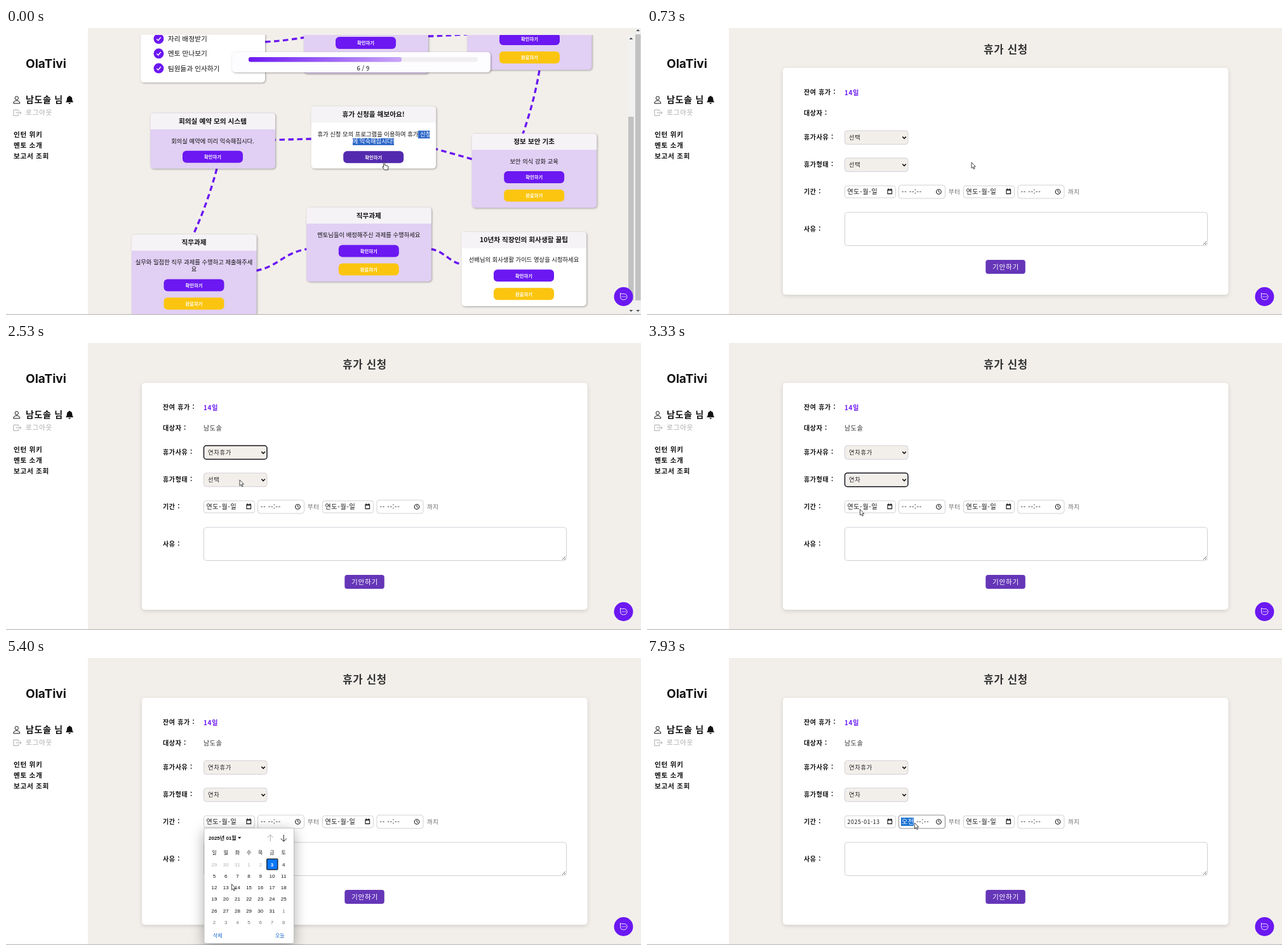
These frames come from a looping animation (1000 by 453 pixels, 8000 ms). An HTML page:

```html
<!DOCTYPE html>
<html lang="ko">
<head>
<meta charset="utf-8">
<title>휴가 신청</title>
<style>
html, body { margin: 0; width: 100%; height: 100%; overflow: hidden; background: #f2efeb; }
svg { display: block; width: 100vw; height: 100vh; }
text { font-family: "Noto Sans CJK KR", "Noto Sans CJK", "Noto Sans KR", sans-serif; white-space: pre; }
.sp { letter-spacing: .67px; }
.cal text { font-family: "Liberation Sans", "Noto Sans CJK KR", sans-serif; }
.card { filter: drop-shadow(1px 1.5px 1.5px #0005); }
.panel { filter: drop-shadow(0 2px 3px #0002); }
.pop { filter: drop-shadow(0 5px 10px #0005); }
</style>
</head>
<body>
<svg id="stage" viewBox="0 0 1000 453" preserveAspectRatio="none"></svg>
<script>
const PURPLE = '#6b18f2', YELLOW = '#fbc50f', BEIGE = '#f2efeb', LILAC = '#e1cff4', BLUE = '#1b67cb';
const USER = '남도솔';

const rect = (x, y, w, h, fill, r = 0, more = '') =>
  `<rect x="${x}" y="${y}" width="${w}" height="${h}" rx="${r}" fill="${fill}" ${more}/>`;
const text = (x, y, size, str, fill = '#111', more = '') =>
  `<text x="${x}" y="${y}" font-size="${size}" fill="${fill}" ${more}>${str}</text>`;
const line = (d, stroke = '#111', w = 1, more = '') =>
  `<path d="${d}" fill="none" stroke="${stroke}" stroke-width="${w}" ${more}/>`;
const group = (id, body, more = '') => `<g id="${id}" ${more}>${body}</g>`;
const MID = 'text-anchor="middle"', BOLD = 'font-weight="700"';
const SP = 'class="sp"', SPB = SP + ' ' + BOLD;

// Task board
const button = (cx, y, label, fill) =>
  rect(cx - 47.5, y, 95, 19, fill, 6) + text(cx, y + 12.3, 7.33, label, '#fff', MID + ' ' + BOLD);
const check = (x, y) => `<circle cx="${x}" cy="${y}" r="8" fill="${PURPLE}"/>` +
  line(`M${x - 3.2} ${y + .3}l2.4 2.4 4-5`, '#fff', 1.4);

function card(x, y, h, fill, title, lines, done, ok = PURPLE) {
  const cx = x + 98, by = y + 48 + lines.length * 11.3;
  return `<g class="card">${rect(x, y, 196.5, h, fill, 5)}` +
    `<path d="M${x} ${y + 25.5}v-20.5q0-5 5-5h186.5q5 0 5 5v20.5z" fill="#f5f3f6"/></g>` +
    text(cx, y + 16.3, 10.67, title, '#111', MID + ' ' + BOLD) +
    lines.map((s, i) => s && text(cx, y + 47 + i * 11, 9.33, s, '#111', MID)).join('') +
    button(cx, by, '확인하기', ok) + (done ? button(cx, by + 29, '완료하기', YELLOW) : '');
}

const links = ['M408 22Q440 20 469 15', 'M665 13Q695 12 726 10', 'M840 67Q832 115 814 167',
  'M734 207L677 191', 'M481 175L424 176.5', 'M332 222Q318 275 295 326',
  'M394 383C430 376 436 355 474 349', 'M669 349C690 352 697 369 718 373'];
const tri = (x, y, s) => `<path d="M${x - 3} ${y + s}h6l-3 ${-3 * s}z" fill="#505050"/>`;

const board = `<clipPath id="view"><rect x="129" y="11" width="850" height="441"/></clipPath>
  <g clip-path="url(#view)">` +
  links.map(d => line(d, PURPLE, 3.4, 'stroke-dasharray="8.5 5.5"')).join('') +
  rect(212, -20, 196, 106, '#fff', 5, 'class="card"') +
  ['자리 배정받기', '멘토 만나보기', '팀원들과 인사하기'].map((s, i) =>
    check(240.5, 17 + i * 23.3) + text(255, 21 + i * 23.3, 10.67, s)).join('') +
  rect(469, -20, 196, 92, LILAC, 5, 'class="card"') + button(566.5, 14, '확인하기', PURPLE) +
  rect(726.5, -20, 196, 86, LILAC, 5, 'class="card"') + button(824.5, 8, '확인하기', PURPLE) +
  button(824.5, 37, '완료하기', YELLOW) +
  card(227.5, 134.5, 87.5, LILAC, '회의실 예약 모의 시스템', ['회의실 예약에 미리 익숙해집시다.']) +
  card(480.7, 123.7, 98, '#fff', '휴가 신청을 해보아요!', ['', ''], false, '#532aae') +
  rect(649, 162, 18.5, 12.3, '#2f68c9') + rect(546, 174, 65, 11, '#2f68c9') +
  text(490.5, 171, 9.33, '휴가 신청 모의 프로그램을 이용하여 휴가 <tspan fill="#fff">신청</tspan>') +
  text(578.5, 182, 9.33, '에 익숙해집시다!', '#fff', MID) +
  card(733.7, 166.7, 117, LILAC, '정보 보안 기초', ['보안 의식 강화 교육'], true) +
  card(198, 326, 128, LILAC, '직무과제', ['실무와 밀접한 직무 과제를 수행하고 제출해주세', '요'], true) +
  card(473.3, 283.3, 117, LILAC, '직무과제', ['멘토님들이 배정해주신 과제를 수행하세요'], true) +
  card(717.5, 322, 117, '#fff', '10년차 직장인의 회사생활 꿀팁', ['선배님의 회사생활 가이드 영상을 시청하세요'], true) +
  `<linearGradient id="fill"><stop stop-color="${PURPLE}"/><stop offset="1" stop-color="#c9a6f6"/></linearGradient>` +
  rect(356, 38, 407, 32, '#fdfcfe', 5, 'class="card"') +
  rect(382, 46, 361, 7.5, '#f1eff1', 3) + rect(382, 46, 241, 7.5, 'url(#fill)', 3) +
  text(562.5, 66.5, 9.6, '6 / 9', '#111', MID) + '</g>' +
  rect(979.5, 11, 10, 441, '#f1f1f1') + rect(990, 0, 10, 453, '#f1f1f1') +
  rect(980, 140, 8.5, 290, '#c1c1c1') + rect(991, 10, 8.5, 420, '#c1c1c1') +
  tri(984.3, 17, 1) + tri(995.2, 4, 1) + tri(984.3, 446, -1) + tri(995.2, 446, -1);

// Leave form
const select = (y, id) => rect(311.5, y, 99.5, 21.5, BEIGE, 4, `id="${id}Box" stroke="#d2cfd6"`) +
  text(318, y + 14.2, 9.33, '선택', '#222', `${SP} id="${id}"`) +
  line(`M402.3 ${y + 9.6}l2.8 2.8 2.8-2.8`, '#111', 1.5);
const dateBox = (x, id) => rect(x, 249, 80, 19, '#fff', 3.5, 'stroke="#d2cfd6"') +
  text(x + 4, 262, 10, '연도-월-일', '#111', `${SP} id="${id}"`) +
  line(`M${x + 67.5} 255h6.6v6.6h-6.6zm0 1h6.6m-5.3-2.7v1.5m4-1.5v1.5`, '#111', 1.1);
const timeBox = (x, id) => rect(x, 248, 73, 21, '#fff', 4, `id="${id}Box" stroke="#d2cfd6"`) +
  rect(x + 3.5, 252, 9, 13, '#1b72d3', 0, `id="${id}Mark" display="none"`) +
  text(x + 4.5, 262, 10, '<tspan>--</tspan> --:--', '#111', `${SP} id="${id}"`) +
  `<circle cx="${x + 63}" cy="258.5" r="3.8" fill="none" stroke="#111" stroke-width="1.1"/>` +
  line(`M${x + 63} 256v2.7l1.8 1`, '#111', 1);

const labels = [['잔여 휴가', 105], ['대상자', 138], ['휴가사유', 176], ['휴가형태', 219], ['기간', 262], ['사유', 320.5]];
const form = text(565, 40, 16.67, '휴가 신청', '#333', SPB + ' ' + MID) +
  rect(214, 63, 701.5, 358, '#fff', 5, 'class="panel"') +
  labels.map(([s, y]) => text(247, y, 10, s + ' :', '#111', SPB)).join('') +
  text(311, 105.5, 10, '14일', PURPLE, SPB) +
  text(311, 138, 10, USER, '#333', SP + ' id="person"') +
  select(162, 'reason') + select(205.2, 'kind') +
  dateBox(311.5, 'date') + timeBox(396.5, 'time') + text(475, 261.5, 9.33, '부터', '#666', SP) +
  dateBox(498.5, 'date2') + timeBox(584, 'time2') + text(663, 261.5, 9.33, '까지', '#666', SP) +
  rect(311.5, 291, 571, 52.5, '#fff', 4, 'stroke="#d2cfd6"') +
  line('M876 342l5-5m-2 5l2-2', '#555', .9) +
  rect(533.3, 366, 62.5, 22, '#6536b8', 4) + text(565, 381, 10.67, '기안하기', '#fff', SP + ' ' + MID);

const menu = (id, y, items, hot) => group(id,
  rect(312, y, 98, items.length * 17.8, BEIGE, 2, 'class="pop" stroke="#8a8886" stroke-width=".8"') +
  rect(312.4, y + 18.7, 97.2, 17.6, BLUE) +
  items.map((s, i) => text(318, y + 13.2 + i * 17.8, 9.33, s, i == hot ? '#fff' : '#222', SP)).join(''));

function calendar() {
  const col = i => 328 + i * 18.2;
  let s = rect(312, 268.5, 141.5, 182, '#fff', 3, 'class="pop" stroke="#b5b5b5" stroke-width=".8"') +
    text(319, 286.5, 8, '2025년 01월', '#111', BOLD) + '<path d="M365 282.5h5.4l-2.7 3z" fill="#111"/>' +
    line('M416.3 289.5v-10.5m-4.6 4.7l4.6-4.7 4.6 4.7', '#aaa') +
    line('M437.3 279v10.5m-4.6-4.7l4.6 4.7 4.6-4.7', '#222') +
    rect(410.8, 317.3, 17, 16.6, '#0a78ff', 1, 'stroke="#1b2b40" stroke-width="1.5"');
  [...'일월화수목금토'].forEach((d, i) => s += text(col(i), 309.5, 8, d, '#222', MID));
  for (let i = 0; i < 42; i++) {
    const n = i - 2, day = n < 1 ? n + 31 : n > 31 ? n - 31 : n;
    const color = n == 3 ? '#fff' : n < 3 ? '#b4b4b4' : n > 31 ? '#777' : '#111';
    s += text(col(i % 7), 328.7 + Math.floor(i / 7) * 18.25, 8, day, color, MID + (n == 3 ? ' ' + BOLD : ''));
  }
  return s + text(326, 441, 8, '삭제', BLUE) + text(424, 441, 8, '오늘', BLUE);
}

// Side bar and chat button
const side = rect(0, 0, 129, 452, '#fff') +
  text(31, 62.5, 19, 'OlaTivi', '#111', BOLD + ' style="font-family:Inter,sans-serif"') +
  '<circle cx="16.8" cy="110.6" r="2.7" fill="none" stroke="#111"/>' +
  line('M11.8 119c0-3 2-4.3 5-4.3s5 1.3 5 4.3z') +
  text(31, 118, 14, USER + ' 님', '#111', SPB) +
  '<path d="M94 117.3q2-2 2-5.3 0-3.3 3-4 0-1.1 1.1-1.1t1.1 1.1q3 .7 3 4 0 3.3 2 5.3zM98.3 118.2h3.6q-.4 1.8-1.8 1.8t-1.8-1.8z" fill="#111"/>' +
  line('M19.5 131.5v-2.2h-7.6v9h7.6v-2.2m-4-2.3h8.4m-2.4-2.4l2.4 2.4-2.4 2.4', '#aaa') +
  text(31, 137, 10.67, '로그아웃', '#aaa', SP) +
  ['인턴 위키', '멘토 소개', '보고서 조회'].map((s, i) => text(12, 172 + i * 16.9, 10.67, s, '#111', SPB)).join('');
const chat = `<circle cx="972.5" cy="424" r="15" fill="${PURPLE}"/>` +
  line('M967.5 418.5l2 1.2q8.5-1.2 8.5 4.2 0 5-5.6 5-4.9 0-4.9-5z', '#fff', .9) +
  [970.4, 972.8, 975.2].map(x => `<circle cx="${x}" cy="424" r=".75" fill="#fff"/>`).join('');

const arrow = '<path d="M0 0v9.3l2.1-1.8 1.5 3.2 1.5-.7-1.5-3.1h2.8z" fill="#fff" stroke="#333" stroke-width=".9"/>';
const hand = '<path d="M1.6 7.5V1.2q0-1.2 1-1.2t1 1.2v3.4l4.3.9q1.2.3 1.1 1.7L8.4 12H3.2L.2 8.2q-.8-1.2.2-1.5z" fill="#fff" stroke="#222" stroke-width=".9"/>';

const stage = document.getElementById('stage');
stage.innerHTML = rect(0, 0, 1000, 453, BEIGE) + side + group('board', board) + group('form', form) + chat +
  rect(0, 451.7, 1000, 1.3, '#c3c0bd') +
  menu('menu1', 184.3, ['선택', '연차휴가', '출장휴가', '경조휴가', '건강검진'], 1) +
  menu('menu2', 227.5, ['선택', '연차', '반차'], 1) +
  group('cal', calendar(), 'class="cal"') +
  group('pointer', group('arrow', arrow) + group('hand', hand));

const el = id => document.getElementById(id);
const show = (id, on) => el(id).setAttribute('display', on ? 'inline' : 'none');
const put = (id, s) => { if (el(id).textContent !== s) el(id).textContent = s; };
const ring = (id, on, color = '#15151c', w = 1.5) => {
  el(id).setAttribute('stroke', on ? color : '#d2cfd6');
  el(id).setAttribute('stroke-width', on ? w : 1);
};

// Pointer stops: time, x, y
const stops = [[0, 593, 212], [450, 593, 212], [730, 511, 212], [1000, 511, 212], [1480, 378, 173], [1650, 378, 173],
  [1930, 349.5, 208.5], [2180, 349.5, 210], [2450, 368, 216], [2600, 368, 216], [2800, 345, 251], [2980, 345, 251],
  [3330, 335.5, 262.5], [3450, 337, 262], [3750, 381, 258], [4050, 381, 258], [4470, 370, 307.5], [4800, 368, 320],
  [5600, 353, 363.5], [6400, 353.5, 364], [7100, 412, 262], [7400, 421.5, 260], [8000, 421.5, 260]];

function pointerAt(t) {
  const i = stops.findIndex(s => s[0] > t), [t0, x0, y0] = stops[i - 1], [t1, x1, y1] = stops[i];
  const u = (t - t0) / (t1 - t0), e = u * u * (3 - 2 * u);
  return [x0 + (x1 - x0) * e, y0 + (y1 - y0) * e];
}

function draw(t) {
  const within = (a, b) => t >= a && t < b;
  show('board', t < 450);
  show('form', t >= 450);
  show('hand', t < 450);
  show('arrow', t >= 450);
  show('person', t >= 800);
  show('menu1', within(1600, 2130));
  show('menu2', within(2550, 2930));
  show('cal', within(3870, 6200));
  put('reason', t < 2130 ? '선택' : '연차휴가');
  put('kind', t < 2930 ? '선택' : '연차');
  ring('reasonBox', within(2130, 2550));
  ring('kindBox', within(2930, 3830));
  put('date', t < 6330 ? '연도-월-일' : '2025-01-13');
  el('date').setAttribute('font-size', t < 6330 ? 10 : 8.7);

  const active = t >= 7430, morning = t >= 7750, slot = el('time').firstChild;
  ring('timeBox', active, '#8f8d93', 1.1);
  show('timeMark', active);
  el('timeMark').setAttribute('width', morning ? 20 : 9);
  slot.textContent = morning ? '오전' : '--';
  slot.setAttribute('fill', active ? '#fff' : '#111');

  el('pointer').setAttribute('transform', `translate(${pointerAt(t)})`);
}

const start = performance.now();
function tick() {
  draw((performance.now() - start) % 8000);
  requestAnimationFrame(tick);
}
tick();
</script>
</body>
</html>
```
